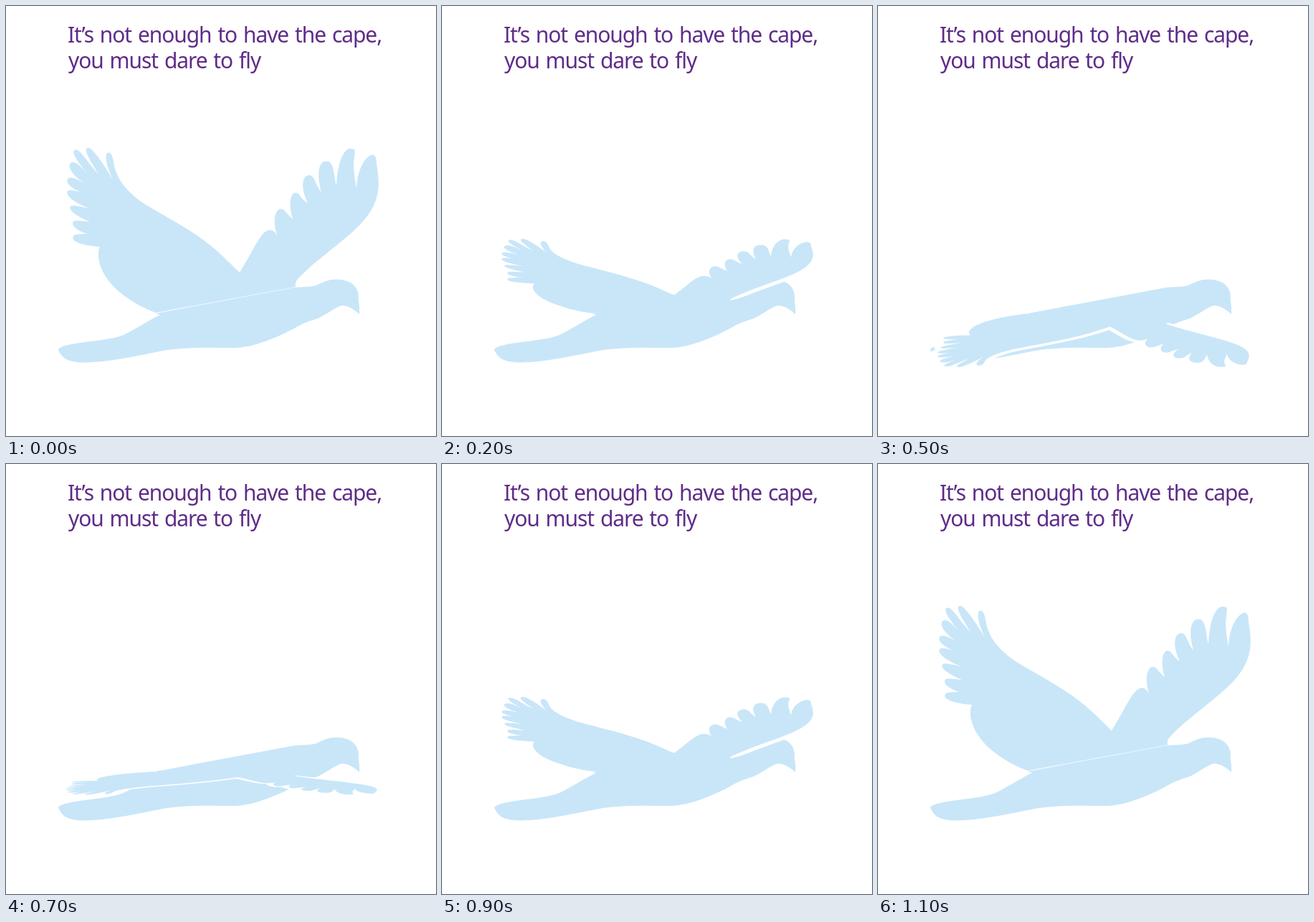
An HTML page that plays this animation: 600 px wide and 600 px high, repeating every 1200 ms.

```html
<!DOCTYPE html>
<html lang="en">
<head>
<meta charset="utf-8">
<title>Dare to fly</title>
<style>
  html, body { margin: 0; width: 100%; height: 100%; overflow: hidden; background: #fff; }
  svg { display: block; width: 100%; height: 100%; }
  text {
    font: 30px "Noto Sans", "Open Sans", sans-serif;
    letter-spacing: -1.1px;
    word-spacing: 2.2px;
    fill: #5f2c88;
  }
  .bird { fill: #c9e6f9; }
  .rim { fill: #fff; stroke: #fff; stroke-width: 18; stroke-linejoin: round; }
</style>
</head>
<body>
<svg viewBox="0 0 600 600">
  <!-- Keeps the white rim away from the edge where wings and body join -->
  <clipPath id="above">
    <path d="M0,0H600V368H437L416,381.5L407,388L398,385L212,420H0Z"/>
  </clipPath>
  <text x="86" y="51">It’s not enough to have the cape,</text>
  <text x="87" y="87">you must dare to fly</text>
  <path class="bird" d="M209,429L404,392.6C415,392 425,392 433,390C444,384 452,381 463,381.5
    C480,382 492,391 492,406C491,413 494,415 493,430C488,426 480,418 468,418
    C456,422 446,432 432,437C420,441 416,442 407,447C385,460 345,477 319,477
    C290,477.5 265,475 225,480C195,485 150,497 108,497.5C92,497 84,494 80,490
    C76,486 73,481 73,479C76,474 95,471 110,469C130,466.5 155,464 168,457
    C185,448 195,441 215,431Z"/>
  <g id="wings">
    <g clip-path="url(#above)"><path class="rim"/></g>
    <path class="bird"/>
  </g>
</svg>
<script>
  // Right wing: trailing edge, then seven feathers down to the shoulder
  const right = `M404,392C403,386 405,383 409,379C430,357 455,340 479,319C523,282 523,255 517,220
    C517,211 515,207.5 511,207.5S491,218 489,255
    C486,235 484,224 486,212S487,199 480,199S463,213 461,251
    C457,235 458,216.5 447,216.5S433,235 440,260
    C431,249 431,236 423,236S409,250 421,275
    C411,269 410,260.5 404,260.5S393,274 400,297
    C392,291 389,283 383,283S371,297 378,320
    C374,314 372,312.5 368,312.5C356,313 347,338 326,372`;

  // Left wing: leading edge, nine feathers, then the curve back to the body
  const left = `C312,359 300,345 280,330C255,310 215,290 190,274C168,259 154,240 151,222
    C149,210 147,204.5 143,204.5S136,214 149,242
    C137,222 121,198 115,198S110,205 129,234
    C117,223 104,200.5 98,200.5S91,207 113,233
    C103,223 99,218 93,218S83,229 109,247
    C100,242 95,239.5 89.5,239.5S80,250 105,260
    C98,258 94,257 89,257S78,267 117,283
    C106,280 99,278.5 93,278.5S84,287 117,301
    C107,300 102,299.5 97,299.5S87,309 113,318
    C105,318 101,318.5 97,319S83,332 131,336
    C127,345 129,356 133,366C143,392 176,416 209,428Z`;

  const wings = document.getElementById("wings");
  for (const path of wings.querySelectorAll("path")) path.setAttribute("d", right + left);

  // Vertical scale of the wings on each step of the downstroke; the upstroke mirrors it
  const lift = [1, .7, .45, .264, -.14, -.324];
  const hinge = 429;

  function draw() {
    const step = Math.floor(performance.now() % 1200 / 100);
    const pose = Math.min(step, 11 - step);
    const shift = pose < 2 ? 0 : -2;
    wings.setAttribute("transform",
      `translate(${shift} ${hinge}) scale(1 ${lift[pose]}) translate(0 ${-hinge})`);
    requestAnimationFrame(draw);
  }
  draw();
</script>
</body>
</html>
```
